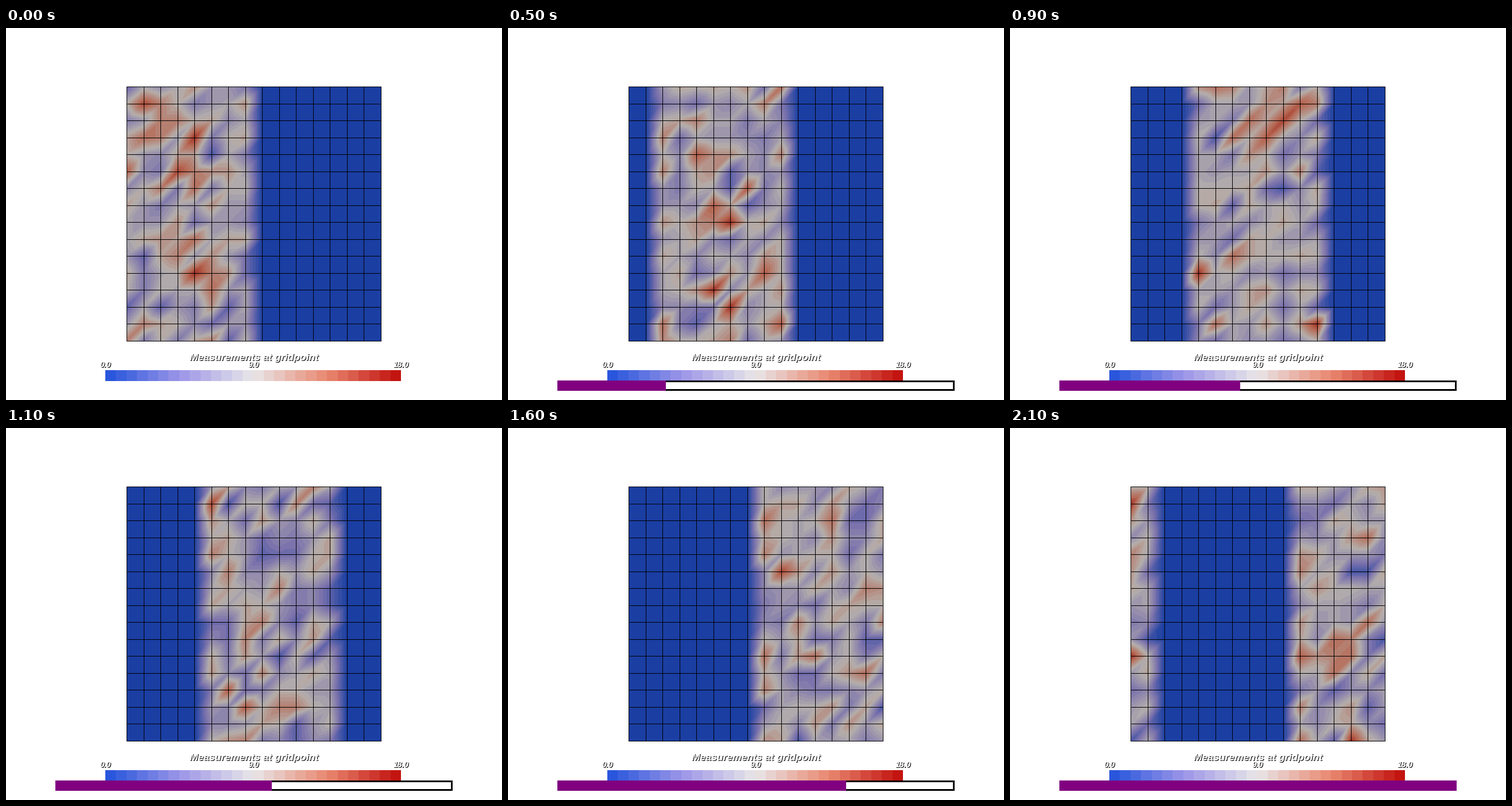
These frames come from a looping animation (864x648 px, 2.2 s). A matplotlib script:

```python
import numpy as np
import matplotlib.pyplot as plt
from matplotlib.animation import FuncAnimation
from matplotlib.colors import LinearSegmentedColormap
from matplotlib.patches import Rectangle
from matplotlib.tri import Triangulation

W, H, DPI = 864, 648, 100
STEPS, N, BAND = 22, 16, 8
LEFT, TOP, CELL = 210, 102, 29.5
VMAX, SHADES = 18, 28
BAR_X, BAR_Y, BAR_W, BAR_H, BORDER = 86, 614, 692, 18, 3
SCALE_X, SCALE_Y, SCALE_W, SCALE_H = 173, 596, 515, 19

CMAP = LinearSegmentedColormap.from_list(
    "blue_red", ["#2152db", "#9c95e8", "#e8e6e8", "#e98870", "#c00c0a"])
LIGHT = np.array([.78, .76, .74])


def measurements(move):
    """Random counts in a band of columns that wraps round the grid."""
    rng = np.random.default_rng(move)
    cols = (move + np.arange(BAND)) % N
    z = np.zeros((N, N))
    z[:, cols] = np.clip(rng.poisson(8, (N, BAND)), 2, 16)
    return z.ravel()


def build_mesh():
    at = .5 + CELL * np.arange(N)
    x, y = np.meshgrid(LEFT + at, TOP + at)
    i = np.arange(N * N).reshape(N, N)
    a, b, c, d = (q.ravel() for q in
                  (i[:-1, :-1], i[:-1, 1:], i[1:, :-1], i[1:, 1:]))
    tris = np.vstack([np.column_stack([a, b, c]), np.column_stack([b, d, c])])
    return Triangulation(x.ravel(), y.ravel(), tris)


def shadow_text(x, y, text, px):
    for d, color in ((1, "black"), (0, "white")):
        ax.text(x + d, y + d, text, color=color, fontsize=px * 72 / DPI,
                family="Liberation Sans", style="italic", weight="bold",
                ha="center", va="baseline", zorder=5 - d)


def box(x, y, w, h, color, z):
    return ax.add_patch(Rectangle((x, y), w, h, facecolor=color, lw=0,
                                  antialiased=False, zorder=z))


fig = plt.figure(figsize=(W / DPI, H / DPI), dpi=DPI, facecolor="white")
ax = fig.add_axes([0, 0, 1, 1])
ax.set(xlim=(0, W), ylim=(H, 0))
ax.axis("off")

# Grid lines on whole pixels
mesh = build_mesh()
ticks = np.floor(CELL * np.arange(N) + .5)
grid = dict(colors="black", lw=72 / DPI, antialiased=False, zorder=3)
ax.vlines(LEFT + ticks, TOP, TOP + ticks[-1], **grid)
ax.hlines(TOP + ticks, LEFT, LEFT + ticks[-1], **grid)

# Colour scale
edges = np.rint(np.linspace(SCALE_X, SCALE_X + SCALE_W, SHADES + 1))
for n in range(SHADES):
    box(edges[n], SCALE_Y, edges[n + 1] - edges[n], SCALE_H,
        CMAP((n + .5) / SHADES), 3)
shadow_text(432, 579, "Measurements at gridpoint", 17.5)
for value in (0, VMAX / 2, VMAX):
    shadow_text(SCALE_X + .5 + SCALE_W * value / VMAX, 591, f"{value:.1f}", 14)

# Field colours, one shade per contour band, centred on zero
step_size = VMAX / (SHADES - 1)
levels = (np.arange(SHADES + 1) - .5) * step_size
shades = CMAP(np.linspace(0, 1, SHADES))[:, :3] * LIGHT

# Progress bar
outline = box(BAR_X, BAR_Y, BAR_W, BAR_H, "black", 6)
inner = box(BAR_X + BORDER, BAR_Y + BORDER, BAR_W - 2 * BORDER,
            BAR_H - 2 * BORDER, "white", 7)
fill = box(BAR_X, BAR_Y, 0, BAR_H, "purple", 8)

field = None


def draw(step):
    """Even steps move the field, odd steps advance the bar."""
    global field
    if field is not None:
        field.remove()
    field = ax.tricontourf(mesh, measurements(step // 2), levels=levels,
                           colors=shades, antialiased=False, zorder=2)
    ax.set(xlim=(0, W), ylim=(H, 0))
    done = (step + 1) // 2
    fill.set_width(BAR_W * done / (STEPS // 2))
    for part in (outline, inner, fill):
        part.set_visible(done > 0)
    return field, outline, inner, fill


anim = FuncAnimation(fig, draw, frames=STEPS, interval=100, repeat=True,
                     repeat_delay=0, blit=False)
plt.show()
```
